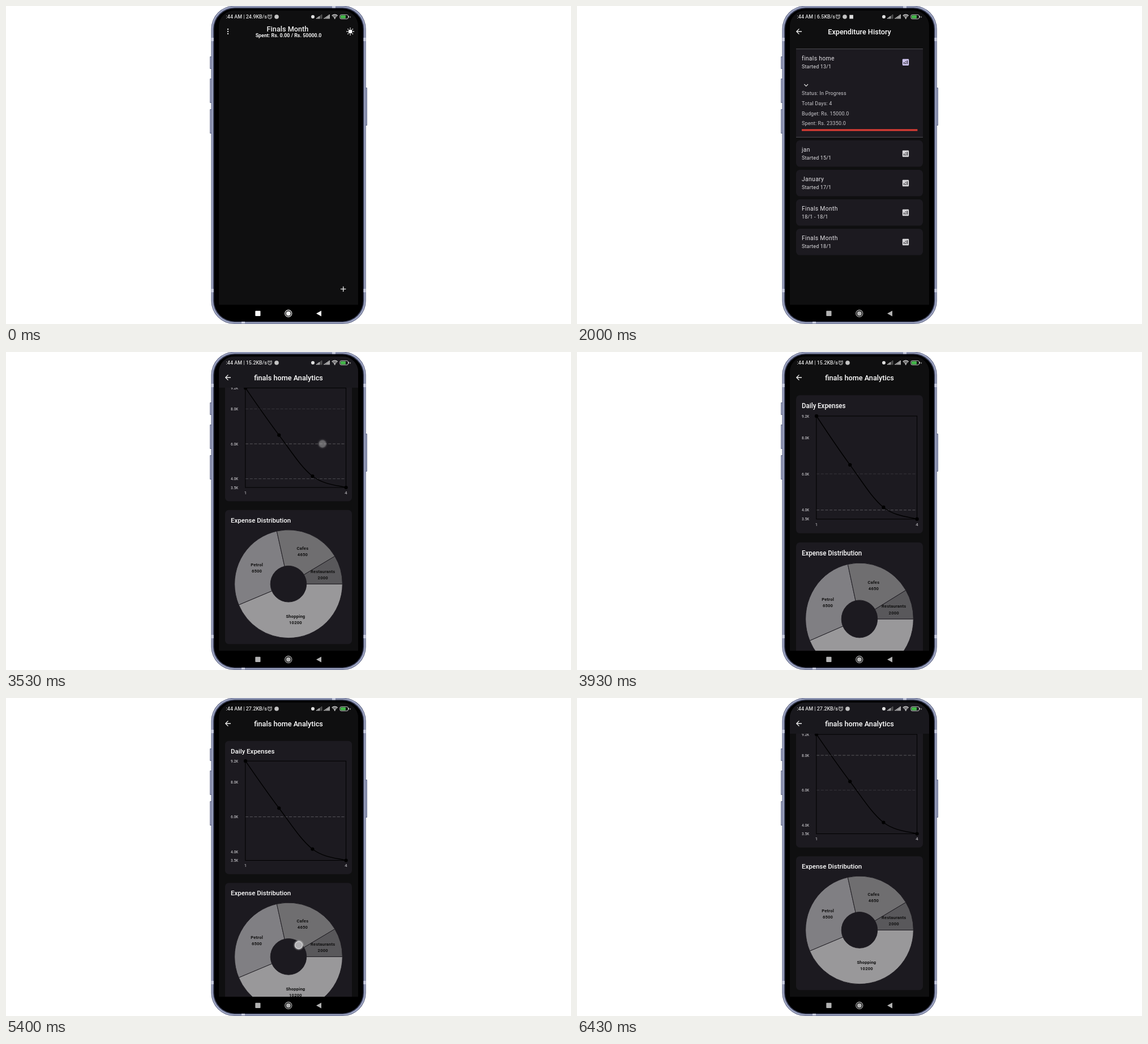
An HTML page with a canvas that plays this animation: 998 px wide and 561 px high, repeating every 6460 ms.

```html
<!DOCTYPE html>
<html lang="en">
<head>
<meta charset="utf-8">
<title>Expense tracker demo</title>
<style>
html, body { margin: 0; width: 100%; height: 100%; overflow: hidden; background: #fff; }
canvas { display: block; width: 998px; height: 561px; }
</style>
</head>
<body>
<canvas id="stage"></canvas>
<script>
const W = 998, H = 561, LOOP = 6460;
const canvas = document.getElementById('stage');
const c = canvas.getContext('2d');
const dpr = window.devicePixelRatio || 1;
canvas.width = W * dpr;
canvas.height = H * dpr;

const BG = '#0f0f10', CARD = '#1c1a20', WHITE = '#f2f2f2';
const VIEW = { x: 376, y: 63, w: 246, h: 464 };
const PAGE_CUT = 1330, ANALYTICS = 2480, MAX_SCROLL = 47;

const clamp = v => Math.max(0, Math.min(1, v));
const ease = v => (1 - Math.cos(Math.PI * clamp(v))) / 2;
const ramp = (t, a, b) => ease((t - a) / (b - a));

// Eased value along [time, value] keys
function track(t, keys) {
  let [t0, v0] = keys[0];
  for (const [t1, v1] of keys) {
    if (t < t1) return v0 + (v1 - v0) * ramp(t, t0, t1);
    t0 = t1; v0 = v1;
  }
  return v0;
}

function layer(draw) { c.save(); draw(); c.restore(); }

function text(s, x, cy, size, { color = WHITE, weight = 400, align = 'left', gap = 0 } = {}) {
  c.font = `${weight} ${size}px Roboto, sans-serif`;
  c.letterSpacing = gap + 'px';
  c.textAlign = align;
  c.fillStyle = color;
  c.fillText(s, x, cy + size * 0.355);
}

function box(x, y, w, h, r, color) {
  c.fillStyle = color;
  c.beginPath();
  c.roundRect(x, y, w, h, r);
  c.fill();
}

function disc(x, y, r, color) {
  c.fillStyle = color;
  c.beginPath();
  c.arc(x, y, r, 0, Math.PI * 2);
  c.fill();
}

function line(points, width, color) {
  c.strokeStyle = color;
  c.lineWidth = width;
  c.beginPath();
  points.forEach(([x, y], i) => i ? c.lineTo(x, y) : c.moveTo(x, y));
  c.stroke();
}

function ring(x, y, r, width, color, from = 0, to = Math.PI * 2) {
  c.strokeStyle = color;
  c.lineWidth = width;
  c.beginPath();
  c.arc(x, y, r, from, to);
  c.stroke();
}

function phone() {
  for (const [x, y, h] of [[360, 89, 22], [360, 128, 43], [360, 182, 43], [634, 144, 67]]) {
    box(x, y, 4, h, 1, '#6a708e');
    box(x + 0.8, y + 1, 2.2, h - 2, 1, '#a0a6c2');
  }
  box(362.4, -0.4, 273.4, 561.4, 41, '#5b6282');
  box(363.4, 0.5, 271.4, 559.6, 40, '#a2a9c6');
  box(365.7, 2.6, 266.8, 555.4, 38, '#454b66');
  for (const [x, y, w, h] of [[362.6, 56, 4, 6], [631.6, 56, 4, 6], [362.6, 499, 4, 6],
                              [631.6, 499, 4, 6], [576, 0, 6, 3.4], [416, 557, 6, 3.4]])
    box(x, y, w, h, 0, '#c9cde0');
  box(367.4, 4.2, 263.4, 552.2, 36.5, '#000');
}

function screenClip() {
  c.beginPath();
  c.roundRect(376, 8, 246, 519, [27, 27, 0, 0]);
  c.clip();
}

function statusBar(t) {
  const speed = t < 760 ? '24.9' : t < 2500 ? '6.5' : t < 4870 ? '15.2' : '27.2';
  const busy = speed === '6.5', dx = busy ? -5 : 0, col = '#dedede';
  text(`:44 AM | ${speed}KB/s`, 388.5, 19, 8.95, { color: col, weight: 500 });

  const ax = 466 + dx;
  ring(ax, 19.2, 3.3, 1, col);
  line([[ax, 17.2], [ax, 19.5], [ax + 1.6, 20.3]], 0.8, col);
  line([[ax - 4.2, 16.7], [ax - 2.2, 15]], 1, col);
  line([[ax + 4.2, 16.7], [ax + 2.2, 15]], 1, col);
  disc(478 + dx, 19, 3.8, '#c4c4c4');
  if (busy) box(481.3, 15.8, 6.6, 6.6, 0, col);

  disc(542, 19, 3, col);
  for (const x of [548, 561.5])
    for (let i = 0; i < 5; i++) {
      const h = 1.6 + i * 1.5;
      box(x + i * 2.2, 22.5 - h, 1.5, h, 0, x < 550 && i > 2 ? '#666' : col);
    }
  for (const r of [2.4, 4.7, 7]) ring(580.7, 22.3, r, 1.4, col, -2.35, -0.79);
  disc(580.7, 22, 1, col);
  c.strokeStyle = '#d5d5d5';
  c.lineWidth = 0.9;
  c.beginPath();
  c.roundRect(589.8, 15.4, 14.6, 7.4, 2.5);
  c.stroke();
  box(591, 16.5, 9, 5.2, 1.2, '#45b94b');
  box(605, 17.6, 1, 3, 0, col);
  box(607.5, 18.2, 1.4, 2.4, 0.6, '#aaa');
}

function navBar(t) {
  const v = Math.round(250 - 72 * ramp(t, 760, 960)), col = `rgb(${v},${v},${v})`;
  box(440.3, 537.8, 9.2, 9.2, 1, col);
  ring(498.8, 542.4, 6, 1.2, col);
  disc(498.8, 542.4, 4, col);
  c.fillStyle = col;
  c.beginPath();
  c.moveTo(548, 542.4);
  c.lineTo(557, 537.4);
  c.lineTo(557, 547.4);
  c.fill();
}

function backArrow() {
  line([[397, 45], [388, 45]], 1.3, WHITE);
  line([[392.4, 40.4], [387.8, 45], [392.4, 49.6]], 1.3, WHITE);
}

const pageTitle = s => text(s, 499, 45.6, 12.7, { weight: 500, align: 'center', color: '#fff' });

function home(t) {
  for (const y of [41, 45, 49]) disc(392, y, 1.15, WHITE);
  text('Finals Month', 497.5, 40.7, 12.7, { weight: 500, align: 'center' });
  text('Spent: Rs. 0.00 / Rs. 50000.0', 499, 52.3, 8.9, { weight: 700, align: 'center' });
  disc(608.2, 45, 3.6, '#fff');
  for (let i = 0; i < 8; i++) {
    const a = i * Math.PI / 4, dx = Math.cos(a), dy = Math.sin(a);
    line([[608.2 + dx * 4.8, 45 + dy * 4.8], [608.2 + dx * 6.7, 45 + dy * 6.7]], 1.3, '#fff');
  }
  line([[591, 499.4], [600.4, 499.4]], 1.3, WHITE);
  line([[595.7, 494.7], [595.7, 504.1]], 1.3, WHITE);

  const open = ramp(t, 300, 480) * (1 - ramp(t, 960, 1150));
  if (open > 0) layer(() => {
    c.globalAlpha = open;
    box(387, 49, 72, 39.5, 3, CARD);
    text('History', 397, 69, 9, { gap: 0.1 });
  });
}

const periods = [
  ['finals home', 'Started 13/1'],
  ['jan', 'Started 15/1'],
  ['January', 'Started 17/1'],
  ['Finals Month', '18/1 - 18/1'],
  ['Finals Month', 'Started 18/1']
];

function chartIcon(y, color) {
  box(574.8, y - 5.6, 11.4, 11.4, 1.3, color);
  box(577, y, 1.3, 3.4, 0, CARD);
  box(579.8, y + 1, 1.3, 2.4, 0, CARD);
  box(579.8, y - 1.8, 1.3, 1.4, 0, CARD);
  box(582.6, y - 3.2, 1.3, 6.6, 0, CARD);
}

function details() {
  line([[401.4, 138], [404.7, 141.4], [408, 138]], 1.2, '#ddd');
  ['Status: In Progress', 'Total Days: 4', 'Budget: Rs. 15000.0', 'Spent: Rs. 23350.0']
    .forEach((s, i) => text(s, 397, 153.8 + i * 17.8, 9, { color: '#c9c8cc', gap: 0.16 }));
  box(397, 217.3, 204.4, 3.1, 0, '#d83c34');
}

function history(t) {
  const open = ramp(t, 1600, 1830);
  backArrow();
  pageTitle('Expenditure History');
  periods.forEach(([name, dates], i) => {
    const first = i === 0;
    const y = 75.7 + i * 52 + (first ? 0 : open * 109.3);
    const h = 46.6 + (first ? open * 109.3 : 0);
    box(387, y, 224, h, first ? 6.5 * (1 - open) : 6.5, CARD);
    text(name, 397, y + 16.7, 10.4, { color: '#e4e2e6', gap: 0.32 });
    text(dates, 397, y + 31, 9, { color: '#e0dfe2', gap: 0.16 });
    chartIcon(y + 23.4, first && open > 0.5 ? '#cfc5ef' : '#d6d5d8');
    if (first && open > 0) layer(() => {
      c.beginPath();
      c.rect(387, y - 1, 224, h + 2);
      c.clip();
      details();
      c.globalAlpha = open;
      line([[387, y], [611, y]], 0.9, '#56545b');
      line([[387, y + h], [611, y + h]], 0.9, '#56545b');
    });
  });
}

const valueY = v => 111.2 + (9200 - v) / 5700 * 175.3;

function gridAlphas(t) {
  if (t < 2970) return [0, 1, 0];
  if (t < 3630) return [0.45, 1, 0.8];
  if (t < 4300) return [0, 0.45, 1];
  return t < 5420 ? [0, 1, 0] : [1, 0.45, 0];
}

function dailyChart(t) {
  box(387, 75.7, 224, 235, 6.5, CARD);
  text('Daily Expenses', 397, 93.6, 11.5, { weight: 500, color: '#fff' });
  for (const v of [9200, 8000, 6000, 4000, 3500])
    text((v / 1000).toFixed(1) + 'K', 397, valueY(v) + 0.3, 6.4, { color: '#b9b8bc', weight: 500 });

  layer(() => {
    c.setLineDash([5.1, 2.6]);
    gridAlphas(t).forEach((a, i) => {
      c.globalAlpha = a;
      const y = valueY(8000 - i * 2000);
      line([[423, y], [600.6, y]], 0.9, '#5f5e63');
    });
  });
  c.strokeStyle = '#000';
  c.lineWidth = 1;
  c.strokeRect(422.8, 111.2, 177.8, 175.3);

  const pts = [9200, 6500, 4150, 3500].map((v, i) => [423 + i * 59.2, valueY(v)]);
  let lead = [0, 0];
  c.lineWidth = 1.4;
  c.beginPath();
  c.moveTo(...pts[0]);
  for (let i = 1; i < pts.length; i++) {
    const prev = pts[i - 1], cur = pts[i], next = pts[i + 1] || cur;
    const bend = [0, 1].map(k => (next[k] - prev[k]) / 2 * 0.35);
    c.bezierCurveTo(prev[0] + lead[0], prev[1] + lead[1],
                    cur[0] - bend[0], cur[1] - bend[1], cur[0], cur[1]);
    lead = bend;
  }
  c.stroke();
  for (const [x, y] of pts) disc(x, y, 3.1, '#000');
  text('1', 423, 295.6, 7.7, { color: '#cfced2', align: 'center' });
  text('4', 600.4, 295.6, 7.7, { color: '#cfced2', align: 'center' });
}

const slices = [
  ['Shopping', 10200, '#99989a'],
  ['Petrol', 6500, '#807f83'],
  ['Cafes', 4650, '#6f6e70'],
  ['Restaurants', 2000, '#59585b']
];

function pie() {
  const x = 499, y = 456.4, total = slices.reduce((sum, s) => sum + s[1], 0);
  box(387, 326.2, 224, 236, 6.5, CARD);
  text('Expense Distribution', 397, 344, 11.5, { weight: 500, color: '#fff' });
  let a = 0;
  const labels = [];
  for (const [name, value, color] of slices) {
    const b = a + value / total * Math.PI * 2, mid = (a + b) / 2;
    c.beginPath();
    c.arc(x, y, 95.3, a, b);
    c.arc(x, y, 31.8, b, a, true);
    c.closePath();
    c.fillStyle = color;
    c.fill();
    c.strokeStyle = CARD;
    c.lineWidth = 0.9;
    c.stroke();
    labels.push([name, value, x + Math.cos(mid) * 63, y + Math.sin(mid) * 63]);
    a = b;
  }
  const style = { color: '#101010', weight: 700, align: 'center', gap: 0.2 };
  for (const [name, value, lx, ly] of labels) {
    text(name, lx, ly - 5, 7.6, style);
    text(value, lx, ly + 6, 7.6, style);
  }
}

function analytics(t) {
  const scroll = track(t, [[3080, 0], [3240, MAX_SCROLL], [3680, MAX_SCROLL], [3800, 0],
                           [5410, 0], [5570, MAX_SCROLL]]);
  const top = track(t, [[3800, 0], [3900, 0.04], [3930, 0.037], [4260, 0]]);
  const bottom = track(t, [[3240, 0], [3340, 0.03], [3540, 0.0015], [3600, 0],
                           [5570, 0], [5700, 0.03], [5980, 0]]);
  layer(() => {
    c.beginPath();
    c.rect(VIEW.x, VIEW.y, VIEW.w, VIEW.h);
    c.clip();
    // Overscroll stretches the content away from the edge it hit
    const anchor = bottom > 0 ? VIEW.y + VIEW.h : VIEW.y;
    c.translate(0, anchor);
    c.scale(1, 1 + top + bottom);
    c.translate(0, -anchor - scroll);
    dailyChart(t);
    pie();
  });
  layer(() => {
    c.globalAlpha = clamp(scroll / 12);
    box(376, 8, 246, 55, 0, '#19181d');
  });
  backArrow();
  pageTitle('finals home Analytics');
}

// [x, y from, y to, down, move start, move end, gone]
const touches = [
  [392, 45, 45, 60, 60, 260, 420],
  [421, 68, 68, 720, 720, 860, 1020],
  [500, 98, 98, 1430, 1430, 1580, 1720],
  [580, 99, 99, 2310, 2310, 2430, 2560],
  [559, 400, 162, 2980, 3040, 3380, 3570],
  [530, 210, 420, 3635, 3660, 3850, 3920],
  [517, 436, 215, 5190, 5400, 5690, 5840]
];

function touchDots(t) {
  for (const [x, y0, y1, down, start, end, gone] of touches) {
    if (t < down || t > gone) continue;
    const y = y0 + (y1 - y0) * ramp(t, start, end);
    layer(() => {
      c.globalAlpha = clamp((t - down) / 90) * clamp((gone - t) / (gone - end));
      const glow = c.createRadialGradient(x, y, 5, x, y, 10);
      glow.addColorStop(0, 'rgba(255,255,255,.6)');
      glow.addColorStop(1, 'rgba(255,255,255,0)');
      disc(x, y, 10, glow);
      disc(x, y, 7.2, '#d2d2d3');
      disc(x, y, 5.8, '#b0afb2');
    });
  }
}

function render(t) {
  c.setTransform(dpr, 0, 0, dpr, 0, 0);
  box(0, 0, W, H, 0, '#fff');
  phone();
  layer(() => {
    screenClip();
    box(376, 8, 246, 519, 0, BG);
    if (t < PAGE_CUT) home(t);
    else {
      const enter = ramp(t, ANALYTICS, ANALYTICS + 270);
      if (enter < 1) history(t);
      if (enter > 0) layer(() => {
        const s = 0.9 + 0.1 * enter;
        c.globalAlpha = enter;
        box(376, 8, 246, 519, 0, BG);
        if (enter < 1) {
          c.translate(499, 295);
          c.scale(s, s);
          c.translate(-499, -295);
          // Inner layers set their own alpha, so they join once the page is mostly in
          if (enter < 0.4) return;
        }
        analytics(t);
      });
    }
    statusBar(t);
    touchDots(t);
  });
  navBar(t);
}

const begin = performance.now();
function tick() {
  render((performance.now() - begin) % LOOP);
  requestAnimationFrame(tick);
}
tick();
</script>
</body>
</html>
```
